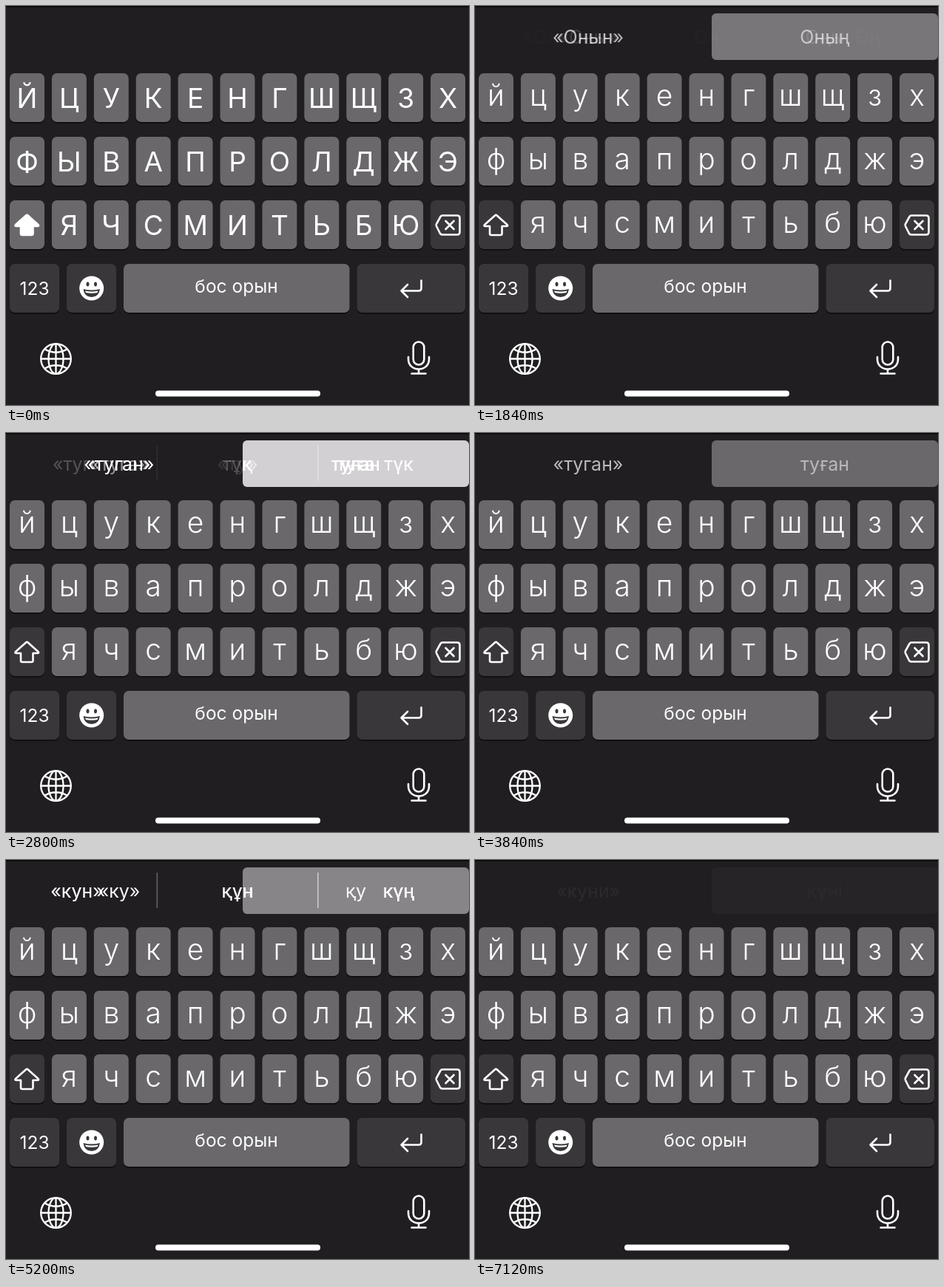
Animation, 626 px wide and 540 px high, one loop 8.56 s. Source, as an HTML page:

```html
<!DOCTYPE html>
<html lang="kk">
<head>
<meta charset="utf-8">
<title>Keyboard</title>
<style>
html, body { margin: 0; width: 100%; height: 100%; overflow: hidden; background: #201e21; }
svg { display: block; width: 626px; height: 540px; isolation: isolate; }
text { font-family: Inter, Roboto, "Noto Sans", sans-serif; fill: #fff; text-anchor: middle; }
.upper text { font-size: 37px; }
.lower text { font-size: 39px; font-weight: 300; }
.label { font-size: 24.5px; }
.bar { mix-blend-mode: plus-lighter; }
.bar text { font-size: 25px; }
.line { fill: none; stroke: #fff; stroke-width: 2.6; stroke-linecap: round; stroke-linejoin: round; }
#popup text { font-size: 49px; font-weight: 300; }
#popup path { filter: drop-shadow(0 0 3px rgba(0,0,0,.35)); }
</style>
</head>
<body>
<svg id="stage" viewBox="0 0 626 540"></svg>
<script>
const LOOP = 8560, STEP = 80, LAST = 7120, CROSS = 560, FADE = 267;
const LIGHT = '#6a686b', DARK = '#39373a';
const rows = ['йцукенгшщзх', 'фывапролджэ', ' ячсмитьбю'];

// Each word typed: when its suggestions show, and when the space key clears them.
const sessions = [
  { clear: 1733, sets: [[880, '«О»'], [1260, '«Он»', 'Оң', 'Өң'], [1330, '«Оны»', 'Оңы'], [1440, '«Онын»', 'Оның']] },
  { clear: 3734, sets: [[2160, '«т»'], [2290, '«ту»'], [2350, '«туг»', 'тұқ', 'түк'], [2402, '«туга»', 'туға'], [2503, '«туган»', 'туған']] },
  { clear: 6864, sets: [[4680, '«к»'], [4740, '«ку»', 'қу'], [5060, '«кун»', 'құн', 'күң'], [5215, '«куни»', 'күні']] }
];
const presses = [
  [720, 880, 'О'], [1200, 1280, 'н'], [1280, 1360, 'ы'], [1360, 1440, 'н'],
  [2080, 2160, 'т'], [2240, 2320, 'у'], [2320, 2400, 'г'], [2400, 2480, 'а'], [2480, 2560, 'н'],
  [4640, 4720, 'к'], [4720, 4800, 'у'], [4960, 5120, 'н'], [5280, 5360, 'и']
];
const spaces = [[1600, 1680], [3600, 3680], [6560, 6800]];
const centres = { 1: [313], 2: [153, 473], 3: [96, 313, 531] };

const keyX = col => 5 + 56.9 * col;
const keyY = row => 91 + 86 * row;
const clamp = x => Math.max(0, Math.min(1, x));
const smooth = x => x * x * (3 - 2 * x);
const text = (x, y, s, cls = '') => `<text class="${cls}" x="${x}" y="${y}">${s}</text>`;
const rect = (x, y, w, h, r, fill, extra = '') =>
  `<rect x="${x}" y="${y}" width="${w}" height="${h}" rx="${r}" fill="${fill}" ${extra}/>`;
const key = (x, y, w, fill, id = '') =>
  rect(x, y + 1.8, w, 66, 7, '#0e0d0f') + rect(x, y, w, 66, 7, fill, id && `id="${id}"`);

function letters(upper) {
  return rows.map((row, r) => [...row].map((c, i) => c === ' ' ? '' :
    text(keyX(i) + 23.5, keyY(r) + (upper ? 46.5 : 44), upper ? c.toUpperCase() : c)).join('')).join('');
}

function bar(words) {
  const n = words.length;
  const back = n === 2 ? rect(320, 10, 306, 63, 6, '#7b7a7b') : '';
  const rules = n === 3 ? [203.5, 421].map(x => rect(x, 17, 1.6, 48, 0, '#454446')).join('') : '';
  return `<g class="bar">${back}${rules}${words.map((w, i) => text(centres[n][i], 50.5, w)).join('')}</g>`;
}

function icons() {
  return `
  <path class="line" d="M590 283.5H610Q613.5 283.5 613.5 287V306Q613.5 309.5 610 309.5H590Q588.5 309.5 587 308L582 298Q581 296.500 582 295L587.500 285Q588.500 283.500 590 283.500ZM594.500 291L605.500 302M605.500 291L594.500 302"/>
  <path class="line" d="M561.500 371.500V382Q561.500 385.500 558 385.500H535M543 377L534.500 385.500L543 394"/>
  <circle cx="115.700" cy="382" r="16.500" fill="#fff"/>
  <ellipse cx="110.500" cy="376.500" rx="2" ry="3" fill="${DARK}"/>
  <ellipse cx="121" cy="376.500" rx="2" ry="3" fill="${DARK}"/>
  <path d="M104.500 383Q115.700 386 127 383Q125.500 394 115.700 394T104.500 383Z" fill="${DARK}"/>
  <path d="M107 385.500Q115.700 387.500 124.500 385.500L123.500 388Q115.700 389.500 108 388Z" fill="#fff"/>
  <g class="line" style="stroke-width:2.3">
    <circle cx="67.500" cy="477.500" r="20.300"/><ellipse cx="67.500" cy="477.500" rx="10" ry="20.300"/>
    <path d="M67.500 457.500V498M47.500 477.500H87.500M52.500 464.500Q67.500 473 82.500 464.500M52.500 490.500Q67.500 482 82.500 490.500"/>
  </g>
  <g class="line">
    <rect x="550.700" y="454.500" width="14.600" height="31" rx="7.300"/>
    <path d="M544 475V478C544 496 572 496 572 478V475M558 491.500V497.500M548.500 497.500H567.500"/>
  </g>
  ${rect(202, 520.5, 223, 8, 4, '#fff')}`;
}

const arrow = 'M27 283.5Q28.300 282.300 29.600 283.500L43.500 296Q45 298 43 298H36.500V308Q36.500 310 34.500 310H22Q20 310 20 308V298H13.500Q11.500 298 13 296Z';

// Enlarged key cap, relative to the key's top centre.
const cap = 'M-30.500 -86H30.500Q44.500 -86 44.500 -72V-17C44.500 3 23.500 -2 23.500 27V59Q23.500 66 16.500 66H-16.500Q-23.500 66 -23.500 59V27C-23.500 -2 -44.500 3 -44.500 -17V-72Q-44.500 -86 -30.500 -86Z';

const layers = sessions.flatMap(({ clear, sets }) => sets.map(([start, ...words], i) =>
  ({ start, clear, words, end: i + 1 < sets.length ? sets[i + 1][0] : Infinity })));

const stage = document.getElementById('stage');
stage.innerHTML = rect(0, 0, 626, 540, 0, '#201e21') + rect(0, 0, 626, 1.6, 0, '#070708') +
  layers.map(l => bar(l.words)).join('') +
  rows.map((row, r) => [...row].map((c, i) =>
    key(keyX(i), keyY(r), 47, LIGHT, c === ' ' ? 'shift' : '')).join('')).join('') +
  key(keyX(10), keyY(2), 47, DARK) +
  key(5, 349, 67, DARK) + key(82, 349, 67, DARK) +
  key(159, 349, 305.5, LIGHT, 'space') + key(474.5, 349, 146.5, DARK) +
  `<g class="upper" id="upper">${letters(true)}</g><g class="lower" id="lower">${letters(false)}</g>` +
  `<path id="arrow" class="line" d="${arrow}"/>` +
  text(38.5, 391, '123', 'label') + text(311.5, 388, 'бос орын', 'label') + icons() +
  `<g id="popup"><path d="${cap}" fill="${LIGHT}"/>${text(0, -24, '')}</g>`;

const $ = id => document.getElementById(id);
const [shift, space, upper, lower, arrowEl, popup] =
  ['shift', 'space', 'upper', 'lower', 'arrow', 'popup'].map($);
const bars = [...stage.querySelectorAll('.bar')];
const show = (el, on) => el.style.display = on ? '' : 'none';
const within = t => ([from, to]) => t >= from && t < to;

function barAlpha(l, t) {
  if (t < l.start) return 0;
  const cross = 1 - smooth(clamp((t - l.end) / CROSS));
  return cross * (1 - clamp((Math.min(t, LAST) - l.clear) / FADE));
}

function draw(t) {
  layers.forEach((l, i) => {
    const a = barAlpha(l, t);
    show(bars[i], a > 0.004);
    bars[i].style.opacity = a;
  });

  const caps = t < 880;
  show(upper, caps);
  show(lower, !caps);
  shift.setAttribute('fill', caps ? LIGHT : DARK);
  arrowEl.style.fill = caps ? '#fff' : 'none';
  space.setAttribute('fill', spaces.some(within(t)) ? DARK : LIGHT);

  const press = presses.find(within(t));
  show(popup, press);
  if (press) {
    const c = press[2], low = c.toLowerCase();
    const r = rows.findIndex(row => row.includes(low));
    popup.setAttribute('transform', `translate(${keyX(rows[r].indexOf(low)) + 23.5} ${keyY(r)})`);
    popup.lastChild.textContent = c;
  }
}

const begin = performance.now();
function tick() {
  const t = (performance.now() - begin) % LOOP;
  draw(Math.floor(t / STEP) * STEP);
  requestAnimationFrame(tick);
}
tick();
</script>
</body>
</html>
```
